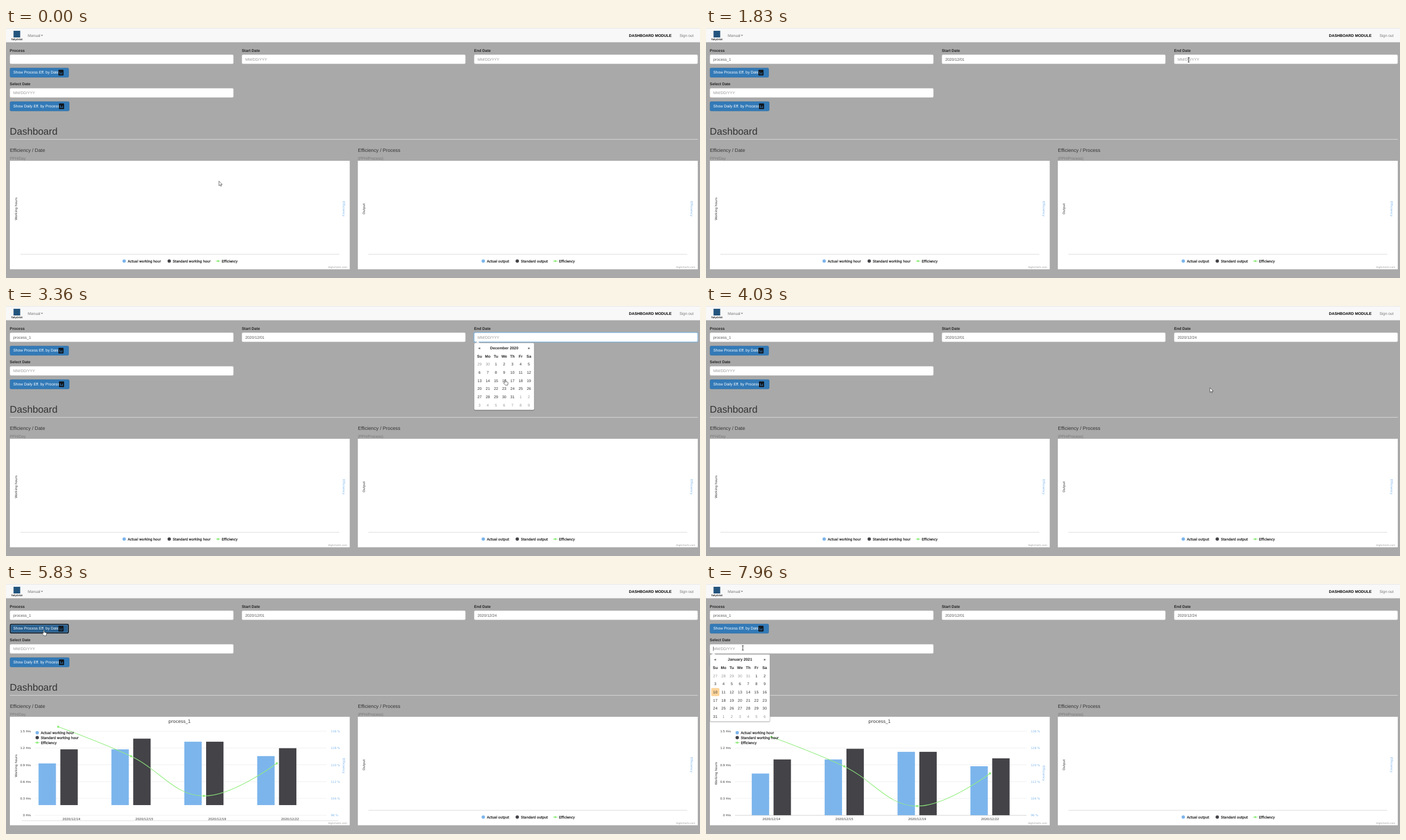
Animation of 1245x450 px, one loop 8000 ms. Source, as an HTML page:

```html
<!DOCTYPE html>
<html lang="en">
<head>
<meta charset="utf-8">
<title>Dashboard</title>
<style>
html, body { margin: 0; width: 100%; height: 100%; overflow: hidden; background: #a9a9a9; }
svg { display: block; }
text { font: 6.9px "Liberation Sans", Arial, sans-serif; fill: #333; white-space: pre;
  text-rendering: geometricPrecision; font-variant-ligatures: none; }
.b { font-weight: bold; fill: #222; }
.m { text-anchor: middle; }
.e { text-anchor: end; }
.c { font-family: "DejaVu Sans", sans-serif; }
.k { font-size: 5.93px; stroke: #333; stroke-width: .3px; }
</style>
</head>
<body>
<svg id="stage" width="1245" height="450" viewBox="0 0 1245 450"></svg>
<script>
const LOOP = 8000;
const BLUE = '#7cb5ec', DARK = '#434348', GREEN = '#90ed7d';
const clamp = v => Math.min(1, Math.max(0, v));
const mix = (a, b, p) => a + (b - a) * p;
const swing = p => .5 - Math.cos(Math.PI * clamp(p)) / 2;

const text = (x, y, s, cls = '', style = '', more = '') =>
  `<text x="${x}" y="${y}" class="${cls}" style="${style}" ${more}>${s}</text>`;
const rect = (x, y, w, h, fill, more = '') =>
  `<rect x="${x}" y="${y}" width="${w}" height="${h}" fill="${fill}" ${more}/>`;
const line = (x1, x2, y, color, w = .7) =>
  `<path d="M${x1} ${y}H${x2}" stroke="${color}" stroke-width="${w}"/>`;
const dot = (x, y, r, fill) => `<circle cx="${x}" cy="${y}" r="${r}" fill="${fill}"/>`;
const turned = (x, y, s, angle, color) =>
  text(0, 0, s, 'c m', `font-size:5.7px;fill:${color}`, `transform="translate(${x} ${y}) rotate(${angle})"`);

// Interaction times
const START = { open: 500, close: 900 };
const END = { open: 2060, back: 2560, close: 3760 };
const SELECT = { open: 7960, close: 9000 };
const HOVER = 4700, PRESS = 5430, CHART = 5630, SHIFT = 5735;

function field(x, y, label, value, t, use) {
  const glow = use ? clamp((t - use.open) / 150) - clamp((t - use.close) / 150) : 0;
  const focused = use && t >= use.open && t < use.close;
  const caret = focused && Math.floor((t + 20) / 500) % 2;
  return text(x, y - 5.2, label, 'b') +
    (glow ? rect(x - .5, y - .5, 402, 17.5, 'none', `rx="2.5" stroke="#66afe9" stroke-width="1.6" opacity="${glow * .45}"`) : '') +
    rect(x + .2, y, 401, 16.6, '#fff', 'rx="2" stroke="#ccc" stroke-width=".5"') +
    (glow ? rect(x + .2, y, 401, 16.6, 'none', `rx="2" stroke="#66afe9" stroke-width=".6" opacity="${glow}"`) : '') +
    text(x + 6.2, y + 10.6, value || 'MM/DD/YYY', '', `fill:${value ? '#555' : '#999'}`) +
    (caret ? rect(x + 6, y + 4.2, .6, 8, '#222') : '');
}

function button(y, w, label, state) {
  const fill = ['#337ab7', '#286090', '#204d74', '#286090'][state];
  const x = w - 9.8;
  return rect(7.2, y, w, 16.7, fill, `rx="2" stroke="${['#2e6da4', '#204d74'][state] || '#122b40'}" stroke-width=".6"`) +
    (state > 1 ? rect(8, y + .7, w - 1.6, 15.3, 'none', 'rx="1.5" stroke="#101418" stroke-width="1.3"') +
      rect(9.1, y + 1.8, w - 3.8, 13.1, 'none', 'rx="1" stroke="#c8dcee" stroke-width=".5" opacity=".6"') : '') +
    text(13, y + 10.3, label, '', 'fill:#fff') +
    rect(x - 1.4, y + 3.2, 9.2, 10.2, '#10151b', 'rx="1"') +
    [[1, 5], [3, 2.5], [5, 4]].map(([dx, h]) => rect(x - .4 + dx, y + 11.5 - h, 1, h, fill)).join('');
}

function calendar(x, y, year, month, hover) {
  const cx = i => x + 9.6 + 14.75 * i, cy = i => y + 9.2 + 14.66 * i;
  const lead = new Date(year, month, 1).getDay();
  const name = ['January', 'December'][month ? 1 : 0];
  const cell = (i, j, fill) => rect(cx(i) - 7.3, cy(j) - 7.4, 14.6, 14.6, fill, 'rx="2"');
  let s = rect(x, y + 1, 107.6, 121.5, '#000', 'rx="2.5" opacity=".1"') +
    rect(x - .8, y + .4, 109.2, 121.4, '#000', 'rx="2.5" opacity=".1"') +
    rect(x, y, 107.6, 120.6, '#fff', 'rx="2" stroke="#999" stroke-width=".4"') +
    `<path d="M${x + 3} ${y + .2}l3.4-3.2l3.4 3.2z" fill="#fff"/>`;
  if (hover) s += cell(...hover, '#eee');
  s += text(cx(0), cy(0) + 2.4, '«', 'b m') + text(cx(3), cy(0) + 2.4, `${name} ${year}`, 'b m') +
    text(cx(6), cy(0) + 2.4, '»', 'b m');
  ['Su', 'Mo', 'Tu', 'We', 'Th', 'Fr', 'Sa'].forEach((d, i) => s += text(cx(i), cy(1) + 2.4, d, 'b m'));
  for (let n = 0; n < 42; n++) {
    const day = new Date(year, month, 1 - (lead || 7) + n + (lead ? 0 : 7));
    const i = n % 7, j = 2 + Math.floor(n / 7), inside = day.getMonth() === month;
    if (inside && month === 0 && day.getDate() === 10) s += cell(i, j, '#fdd49a');
    s += text(cx(i), cy(j) + 2.4, day.getDate(), 'm', `fill:${inside ? '#333' : '#999'}`);
  }
  return s;
}

function legend(items) {
  return items.map(([x, y, label], i) => (i < 2
    ? dot(x, y, 3, [BLUE, DARK][i])
    : line(x - 4.2, x + 4.2, y, GREEN, 1) + dot(x, y, 1.9, GREEN)) +
    text(x + 6.5, y + 2.2, label, 'c k')).join('');
}

const credit = x => text(x, 432, 'Highcharts.com', 'c e', 'font-size:4.35px;fill:#999');

function emptyChart(x, title, items) {
  return turned(x + 13, 325.5, title, -90, '#333') + turned(x + 596.7, 325.5, 'Efficiency', 90, BLUE) +
    line(x + 19, x + 591, 407.3, '#ccc') + legend(items);
}

function effChart(t) {
  const p = swing((t - SHIFT) / 500), rest = 1 - p;
  let s = text(311.3, 250.4, 'process_1', 'c m', 'font-size:8.1px');
  for (let i = 0; i < 6; i++) {
    const y = 265 + 30.25 * i;
    s += line(52, 575, y, '#e6e6e6', .6) +
      text(44.6, y + 2, `${i < 5 ? (1.5 - .3 * i).toFixed(1) : 0} Hrs`, 'c e', 'font-size:5.3px') +
      text(582.8, y + 2, `${136 - 8 * i} %`, 'c', `font-size:5.2px;fill:${BLUE}`);
  }
  s += line(mix(26, 52, p), mix(598, 575, p), mix(427, 416.4, p), '#ccc');
  s += `<g transform="translate(${-26 * rest} ${-20 * rest})">`;
  [[341.2, 315.8], [315.8, 296.6], [302.1, 302.1], [328, 313.8]].forEach((tops, i) => tops.forEach((top, j) =>
    s += rect(82.1 + 130.75 * i + 39.1 * j, top, 31.2, 416.2 - top, [BLUE, DARK][j])));
  s += `<path d="M117.3 275.3C117.3 275.3 195.7 303.4 248 328.3S326.4 399.8 378.7 399.8S509.5 341 509.5 341" fill="none" stroke="${GREEN}" stroke-width="1.1"/>` +
    dot(117.3, 275.3, 2, GREEN) + dot(248, 328.3, 2, GREEN) + dot(378.7, 399.8, 2, GREEN) + dot(509.5, 341, 2, GREEN) + '</g>';
  ['14', '15', '19', '22'].forEach((d, i) =>
    s += text(117.3 + 130.75 * i, 425.4, '2020/12/' + d, 'c m', 'font-size:5.6px'));
  return s + turned(19.5, mix(326, 341, p), 'Working hours', -90, '#333') +
    turned(603.7, mix(326, 340.5, p), 'Efficiency', 90, BLUE) +
    legend([[56, 267.7, 'Actual working hour'], [56, 276.6, 'Standard working hour'], [56, 285.5, 'Efficiency']]);
}

// Pointer stops: time, x, y
const STOPS = [
  [1020, 463, 103.5], [1160, 774, 70], [1960, 872, 56.5], [2100, 872, 56.5], [2450, 850, 73],
  [2880, 850, 73], [3560, 907, 147], [3760, 907, 147], [3980, 904, 147], [4150, 904, 147],
  [4560, 138, 84], [4900, 68, 83], [6230, 68, 83], [6430, 66, 108.5], [6760, 66, 115]
];
function pointerAt(t) {
  if (t < 500) return [382, 275.5];
  const n = STOPS.findIndex(s => s[0] > t);
  if (n === 0) return STOPS[0].slice(1);
  if (n < 0) return STOPS[STOPS.length - 1].slice(1);
  const [a, b] = [STOPS[n - 1], STOPS[n]], p = swing((t - a[0]) / (b[0] - a[0]));
  return [mix(a[1], b[1], p), mix(a[2], b[2], p)];
}

const SHAPES = {
  arrow: '<path d="M0 0V8.4L2 6.7L3.3 9.4L4.6 8.8L3.4 6.2H6Z" fill="#fff" stroke="#111" stroke-width=".6"/>',
  hand: '<path d="M-.9 5.6V.8a.9.9 0 0 1 1.8 0V3.9l3.2.8q.9.3.8 1.3L4.2 10H0L-3 6.7q-.3-1.2 1-1.1Z" fill="#fff" stroke="#111" stroke-width=".6"/>',
  beam: '<path d="M-1.6-4h3.2M0-4v8M-1.6 4h3.2" stroke="#111" stroke-width=".8"/>'
};
function pointer(t, x, y) {
  const inField = (l, top) => x >= l && x <= l + 401 && y >= top && y <= top + 16.6;
  const onDay = t >= START.open && t < START.close || t >= 2350 && t < END.close;
  const onButton = x > 7 && x < 112 && y > 72 && y < 89;
  const kind = onDay || onButton ? 'hand' : inField(840, 48) || inField(7, 104) ? 'beam' : 'arrow';
  return `<g transform="translate(${x.toFixed(2)} ${y.toFixed(2)})">${SHAPES[kind]}</g>`;
}

const frame = rect(0, 0, 1245, 450, '#a9a9a9') + rect(0, 0, 1245, 25.5, '#f8f8f8') +
  line(0, 1245, .3, '#ddd') + line(0, 1245, 25.6, '#e7e7e7', .5) +
  rect(13.5, 5, 12, 12, '#24557d') + text(19.5, 22.3, 'TallyOrbit', 'b m', 'font-size:4.5px') +
  text(39, 15.7, 'Manual', '', 'fill:#777') + '<path d="M62.5 12.4h4l-2 2z" fill="#777"/>' +
  text(1117.5, 15.7, 'DASHBOARD MODULE', 'b', 'fill:#000') + text(1208.2, 15.7, 'Sign out', '', 'fill:#777') +
  text(6.8, 192.2, 'Dashboard', '', 'font-size:17.5px') + line(7, 1241, 200.4, '#eee') +
  text(7, 222.5, 'Efficiency / Date', '', 'font-size:8.75px') +
  text(631.2, 222.5, 'Efficiency / Process', '', 'font-size:8.75px') +
  text(7, 236.8, 'PPH/Day', '', 'fill:#777') + text(631.2, 236.8, '(PPH/Process)', '', 'fill:#777') +
  rect(7, 239, 609.6, 195.3, '#fff') + rect(631.2, 239, 609.8, 195.3, '#fff') + credit(612) + credit(1236.4) +
  emptyChart(631.2, 'Output', [[856.2, 419.6, 'Actual output'], [917.2, 419.6, 'Standard output'], [985.4, 419.6, 'Efficiency']]);
const blank = emptyChart(7, 'Working hours',
  [[212, 419.6, 'Actual working hour'], [292.8, 419.6, 'Standard working hour'], [380.5, 419.6, 'Efficiency']]);

function draw(t) {
  const [x, y] = pointerAt(t);
  const state = t < HOVER || t >= SELECT.open ? 0 : t < PRESS ? 1 : t < CHART ? 2 : 3;
  let s = frame + (t < CHART ? blank : effChart(t)) +
    field(6.8, 48, 'Process', t >= 500 ? 'process_1' : ' ', t) +
    field(423, 48, 'Start Date', t >= START.close ? '2020/12/01' : '', t, START) +
    field(839.7, 48, 'End Date', t >= END.close ? '2020/12/24' : '', t, END) +
    field(6.8, 108.5, 'Select Date', '', t, SELECT) +
    button(72, 105.2, 'Show Process Eff. by Date', state) +
    button(132.6, 106.2, 'Show Daily Eff. by Process', 0);
  if (t >= START.open && t < START.close) s += calendar(423.2, 66.4, 2020, 11, [2, 2]);
  if (t >= END.open && t < END.close) {
    const hover = t > 2400 && t < 2950 ? [0, 0] : t > 3400 ? [4, 5] : null;
    s += t < END.back ? calendar(839.9, 66.4, 2021, 0, hover) : calendar(839.9, 66.4, 2020, 11, hover);
  }
  if (t >= SELECT.open) s += calendar(7.1, 126.8, 2021, 0);
  return s + pointer(t, x, y);
}

const stage = document.getElementById('stage');
let shown = '';
function tick() {
  const next = draw(performance.now() % LOOP);
  if (next !== shown) stage.innerHTML = shown = next;
  requestAnimationFrame(tick);
}
tick();
</script>
</body>
</html>
```
